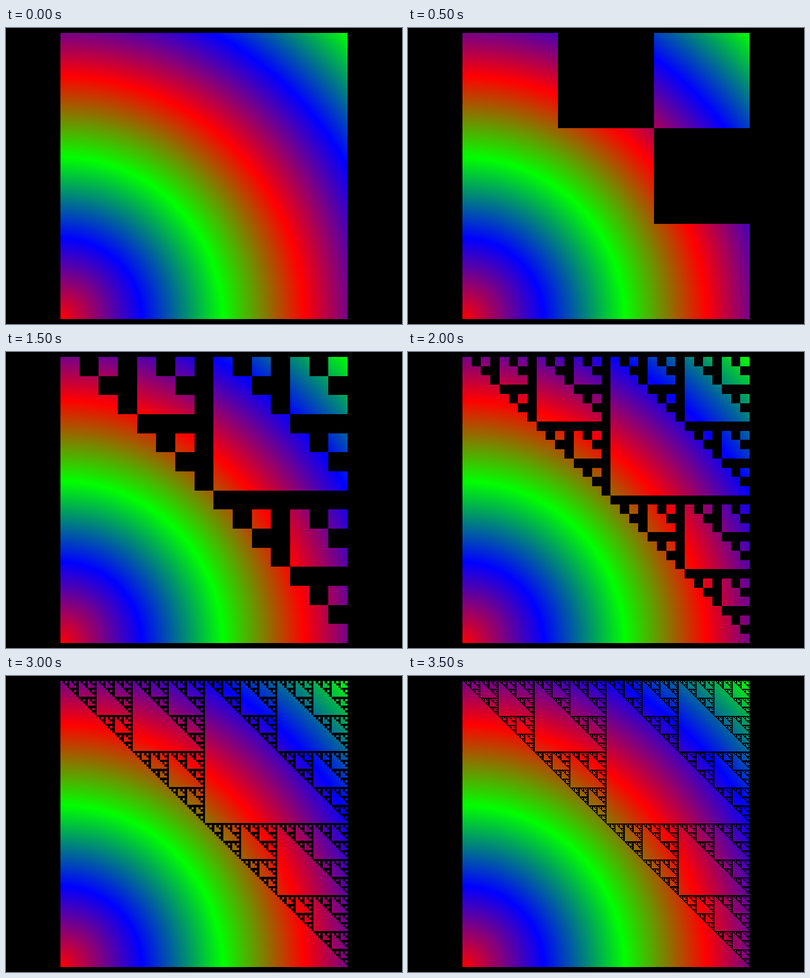
An HTML page with a canvas for the animation above (4 s loop, 800 px wide and 600 px high).

```html
<!DOCTYPE html>
<html lang="en">
<head>
<meta charset="utf-8">
<title>Sierpinski over rainbow</title>
<style>
  html, body { margin: 0; width: 100%; height: 100%; overflow: hidden; background: #000; }
  canvas { display: block; }
</style>
</head>
<body>
<canvas id="stage" width="800" height="600"></canvas>
<script>
const ctx = document.getElementById("stage").getContext("2d");
const LEFT = 110, TOP = 10, SIZE = 580;
const STEP_MS = 500, STEPS = 8;

const rainbow = ctx.createRadialGradient(LEFT, TOP + SIZE, 0, LEFT, TOP + SIZE, SIZE * Math.SQRT2);
["#f00", "#00f", "#0f0", "#f00", "#00f", "#0f0"].forEach((color, i) => rainbow.addColorStop(i / 5, color));

function draw(step) {
  const cells = 2 ** (step + 1) - 1;
  const edge = i => Math.round(i * SIZE / cells);
  ctx.fillStyle = "#000";
  ctx.fillRect(0, 0, 800, 600);
  ctx.fillStyle = rainbow;
  ctx.fillRect(LEFT, TOP, SIZE, SIZE);

  // A cell is black where the binomial coefficient C(col, row) is odd.
  ctx.fillStyle = "#000";
  for (let row = 1; row <= cells; row++) {
    const y = edge(row - 1), height = edge(row) - y;
    for (let col = row; col < cells; col++) {
      if ((col & row) !== row) continue;
      const x = edge(col);
      ctx.fillRect(LEFT + x, TOP + y, edge(col + 1) - x, height);
    }
  }
}

let shown = 0;
const start = performance.now();
function tick() {
  const step = Math.floor((performance.now() - start) / STEP_MS) % STEPS;
  if (step !== shown) draw(shown = step);
  requestAnimationFrame(tick);
}
draw(shown);
tick();
</script>
</body>
</html>
```
